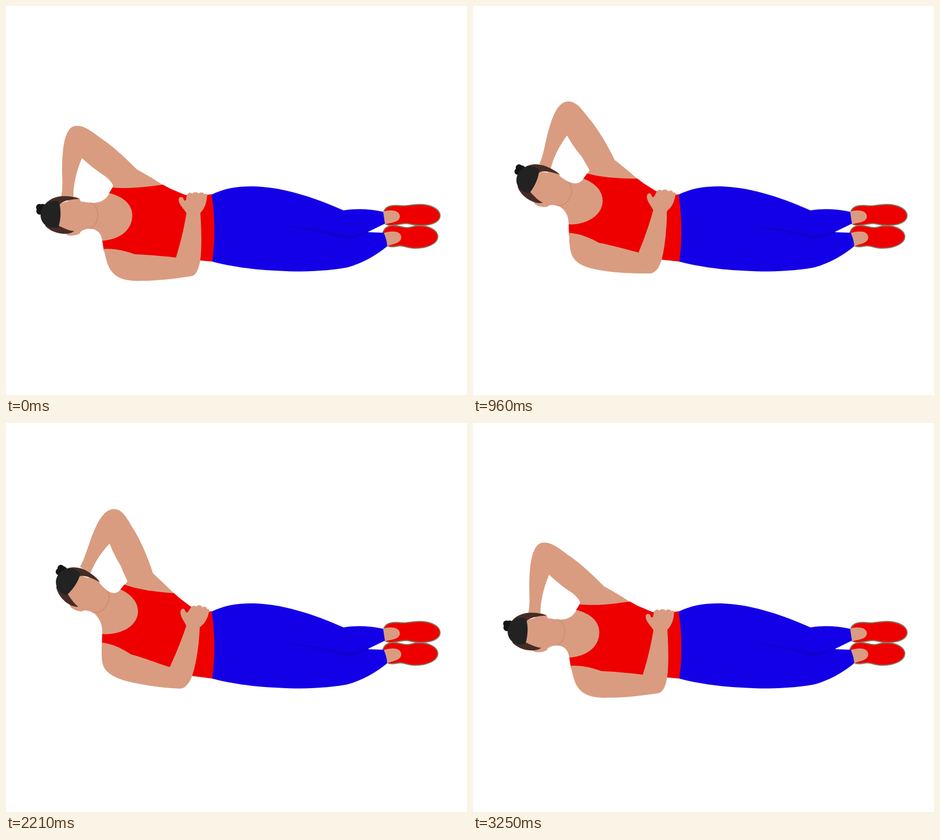
An HTML page that plays this animation: 814 by 688 pixels, repeating every 3290 ms.

```html
<!DOCTYPE html>
<html lang="en">
<head>
<meta charset="utf-8">
<title>Side crunch</title>
<style>
  html, body { margin: 0; width: 100%; height: 100%; overflow: hidden; background: #fff; }
  svg { display: block; width: 100vw; height: 100vh; }
  .skin { fill: #d99c80; }
  .red { fill: #ee0000; }
  .shoe { fill: #ee0000; stroke: #85775e; stroke-width: 1.8; }
</style>
</head>
<body>
<svg viewBox="0 0 814 688">
  <path class="shoe" d="M667 364C670 353 682 352 694 353C706 355 712 351 730 351C752 351 766.500 360 766.500 371C766 382 752 388 732 388C718 388 714 385 707 384.500C698 384.500 690 388 680 388C675 388 672 387 669 385Z"/>
  <path class="shoe" d="M665 402C668 391 676 388 686 388.500C698 389 700 392 708 392C716 392 718 388.500 730 388.500C750 389 762.500 398 762.500 408C762 420 745 428.500 722 428.500C710 428.500 703 424 695 424C685 426 678 427 673 424Z"/>
  <path class="skin" d="M665 364C675 360 695 360 695.500 372C695 383 680 383 669 386Z"/>
  <path class="skin" d="M666 402C680 397 697 397 698 409C697 420 685 420 673 425Z"/>

  <path class="skin" id="raisedArm"/>
  <path class="skin" id="neck"/>
  <path class="red" id="shirt"/>

  <path fill="#1400e6" d="M363 333.500C385 322.500 410 318.500 438 319C495 320.500 555 343 596 361.500C620 357.500 645 359.500 666 364L669 385L638 400L667 401C670 408 673 417 673 425C652 442 630 455 602 462.500C570 468 540 469.500 510 469.500C455 468 410 464 364 452C369.500 420 369.500 370 363 333.500Z"/>
  <path fill="#1200cc" d="M480 388C530 390 575 402 603 406C618 405 630 401 640 399L640 401C625 406 612 412 600 412C580 407 540 395 480 388Z"/>

  <path class="skin" id="lowerArm"/>
  <path class="skin" id="hand"/>

  <g id="head">
    <g fill="#151515"><circle cx="59.500" cy="356" r="6"/><circle cx="60" cy="363" r="6"/><circle cx="65" cy="357" r="7"/></g>
    <path class="skin" d="M108 338C122 335 133 339 132 347L112 350Z"/>
    <path class="skin" d="M92 350L122 342L131 345C140 348 145 347 152 348C160 352 163 360 163 370C163 384 156 392 146 394C138 395 132 398 131 402C125 406 112 408 107 404L92 390Z"/>
    <path fill="none" stroke="#cb8d73" stroke-width="1.600" d="M150 348C159 352 162.500 359 162.500 370C162.500 383 156 391 147 393.500"/>
    <path fill="#452c25" d="M66 355C78 335 105 332 131 341C118 342 104 343 96 350L90 365L92 388C103 393 113 398 121 398C112 406 85 405 70 389Z"/>
    <path fill="#222" d="M93 346C99 357 97 380 93 391C80 396 62 388 61.500 370C62 350 80 341 93 346Z"/>
  </g>
</svg>
<script>
const FPS = 24, FRAMES = 79, REACH = 0.974;
const RISE = { from: 2, length: 40 }, FALL = { to: 80, length: 39 };
const HIP = { x: 365, y: 400 };
const HEAD = { pivot: [79, 369], lying: [78.5, 369], raised: [118, 258], turn: 39 };

// Each part: outline lying down, then raised, with matching points.
const parts = {
  raisedArm: [
    "M97 338C101 325 99 300 99 290C99 255 103 212 124 212C140 211 155 225 172 237C195 253 215 273 231 289C245 297 262 306 277 317L240 328L188 322L189 317C185 309 178 303 172 299C158 290 146 280 134 269C127 285 120 310 119 330L119 340Z",
    "M143 236C152 222 157 208 161 200C176 165 190 141 209 141C225 141 231 160 240 178C252 203 262 236 267 261C279 273 290 286 302 298L260 303L215 279L222 272C218 263 214 253 212 243C206 230 200 216 197 202C184 213 170 230 163 244L158 252Z"],
  neck: [
    "M135 346C160 352 176 346 183 330L205 327L240 365L220 410L190 425L170 416C169 402 160 393 146 394L125 390Z",
    "M174 268C183 285 197 300 208 286L225 289L248 325L230 362L200 375L171 363C174 345 166 328 155 319L140 312Z"],
  shirt: [
    "M188 321C215 324 250 320 277 316L290 323L316 334C335 337 352 334 363 333C373 370 373 420 364 452L342 450L302 448C275 446 250 444 227 443C210 437 190 432 173 434L170 415C195 414 223 400 223 370C223 350 205 336 182 331Z",
    "M215 278C240 289 275 295 302 298L311 307L327 321C340 330 352 335 363 333C373 370 373 420 364 452L324 446L289 431C265 424 240 412 220 406C205 394 190 386 170 382L171 363C205 367 237 350 237 325C237 308 225 295 208 286Z"],
  lowerArm: [
    "M172 430C190 428 210 433 227 439C250 440 275 442 300 445C308 420 315 390 319 364L343 364C345 390 346 430 343 450C340 468 334 478 326 478C300 482 270 486 240 486C215 487 197 483 187 470C177 458 176 440 172 430Z",
    "M170 378C190 382 205 390 220 402C240 408 265 420 287 428C300 402 312 375 319 355L342 359C340 390 335 420 326 444C320 460 310 468 301 467C270 464 235 457 210 449C190 442 176 434 170 421C166 408 169 390 170 378Z"],
  hand: [
    "M319 367C314 358 306 352 305 344C304 337 311 336 313 340C314 344 316 346 318 342L319 336C319 331 326 328 329 332C332 328 339 329 340 332C343 328 350 330 350 333C355 330 356 335 355 337C354 348 351 358 343 366Z",
    "M319 358C315 348 309 341 309 333C309 326 315 324 317 329C318 333 320 335 323 331L328 325C329 321 335 321 338 323C342 318 348 322 349 325C353 322 356 325 356 328C361 327 361 332 359 335C356 346 351 355 342 360Z"]
};

const mix = (a, b, q) => a + (b - a) * q;
const numbers = path => path.match(/[\d.]+/g).map(Number);

// Swing a point around the hip from one place to another.
function swing([ax, ay], [bx, by], q) {
  const polar = (x, y) => [Math.hypot(HIP.x - x, HIP.y - y), Math.atan2(HIP.y - y, HIP.x - x)];
  const [ra, ta] = polar(ax, ay), [rb, tb] = polar(bx, by);
  const r = mix(ra, rb, q), t = mix(ta, tb, q);
  return [HIP.x - r * Math.cos(t), HIP.y - r * Math.sin(t)];
}

const shapes = Object.entries(parts).map(([id, [lying, raised]]) => ({
  node: document.getElementById(id),
  commands: lying.replace(/[\d.]+/g, "#"),
  from: numbers(lying),
  to: numbers(raised)
}));
const head = document.getElementById("head");

function pose(q) {
  for (const { node, commands, from, to } of shapes) {
    const out = [];
    for (let i = 0; i < from.length; i += 2) {
      out.push(...swing([from[i], from[i + 1]], [to[i], to[i + 1]], q));
    }
    let n = 0;
    node.setAttribute("d", commands.replace(/#/g, () => out[n++].toFixed(2)));
  }
  const [x, y] = swing(HEAD.lying, HEAD.raised, q);
  const [px, py] = HEAD.pivot;
  head.setAttribute("transform", `translate(${x} ${y}) rotate(${HEAD.turn * q}) translate(${-px} ${-py})`);
}

function liftAt(ms) {
  const frame = Math.floor((ms + 5) * FPS / 1000) % FRAMES;
  const rise = (frame - RISE.from) / RISE.length;
  const fall = (FALL.to - frame) / FALL.length;
  const lift = Math.max(0, Math.min(rise, fall));
  return (0.5 - 0.5 * Math.cos(Math.PI * lift)) / REACH;
}

const start = performance.now();
function tick() {
  pose(liftAt(performance.now() - start));
  requestAnimationFrame(tick);
}
tick();
</script>
</body>
</html>
```
